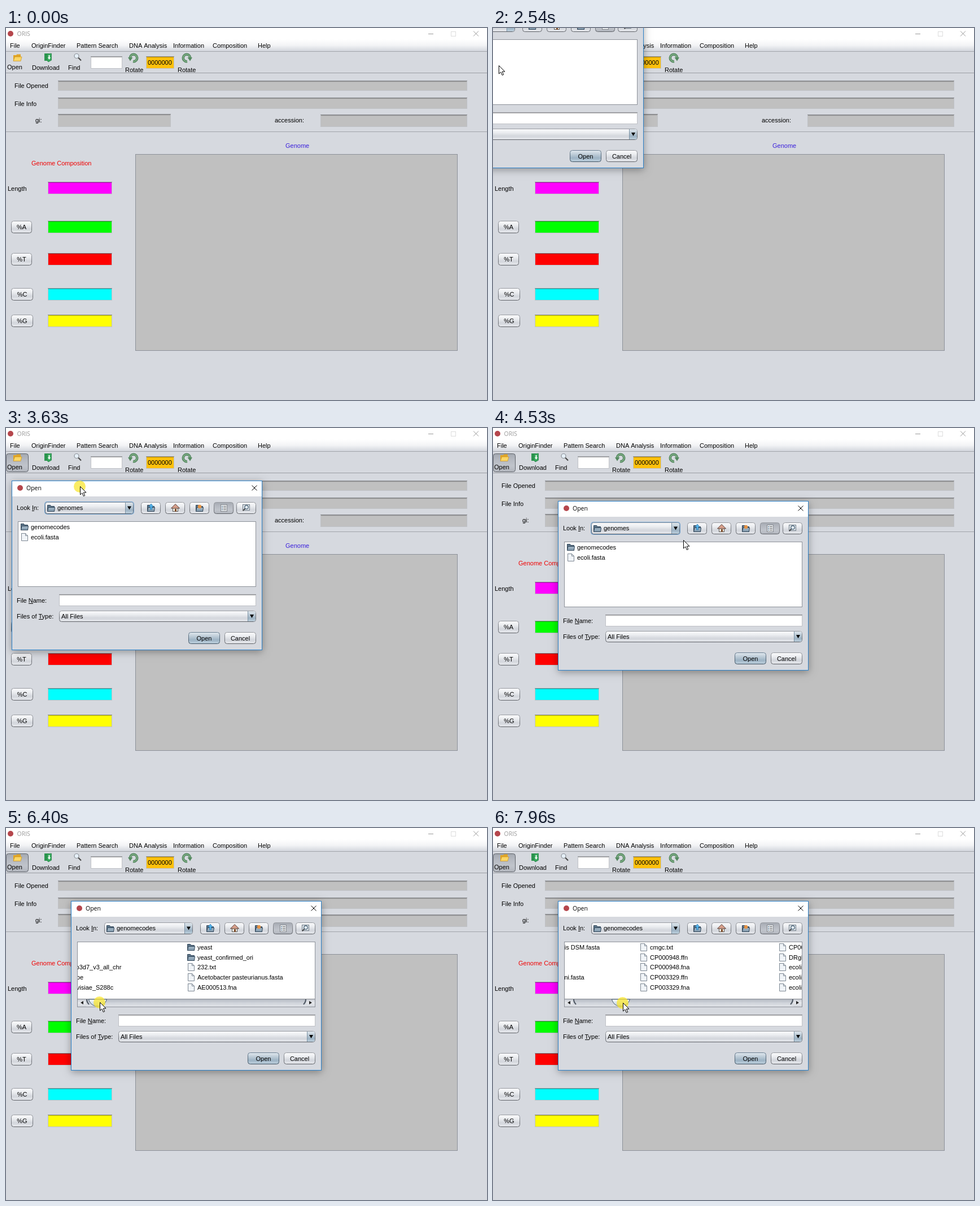
An HTML page with a canvas for the animation above (7.99 s loop, 852 px wide and 658 px high).

```html
<!DOCTYPE html>
<html lang="en">
<head>
<meta charset="utf-8">
<title>Genome viewer</title>
<style>
html, body { margin: 0; width: 100%; height: 100%; overflow: hidden; background: #d6d9df; }
canvas { display: block; width: 100vw; height: 100vh; }
</style>
</head>
<body>
<canvas id="stage" width="852" height="658"></canvas>
<script>
const c = document.getElementById('stage').getContext('2d');
const LOOP = 7990;
const UI = '11px "Liberation Sans", Arial, sans-serif';
const TITLE = '10.5px "Open Sans", sans-serif';
const BG = '#d6d9df', GREY = '#c0c0c0', EDGE = '#8d9199';
const LIGHT = ['#fbfbfc', '#eceef1', '#d3d6dc', '#e9ebef'];
const BLUE = ['#e3eaf0', '#c0ced9', '#9db3c4', '#c3d5e2'];
const DARK = ['#a3a8b0', '#b5b9c1', '#c0c4cb', '#b0b4bc'];

// Mouse positions: time, x, y
const mouse = [
  [60, 790, 705], [940, 14, 66], [2440, 14, 66], [2540, 10, 66], [2800, -56, -42],
  [3380, -56, -42], [3630, 131, 103], [3950, 236, 139], [4110, 236, 139],
  [4450, 348, 190], [4530, 337, 198], [4880, 174, 210], [5250, 174, 210],
  [5690, 180, 262], [5960, 166, 322], [6180, 161.6, 308], [6290, 161.6, 308],
  [6400, 166, 308], [6930, 191.8, 309], [7300, 227, 309], [7420, 229, 309],
  [7615, 229, 309], [7635, 229.4, 309], [7930, 229.4, 309], [7960, 230, 309]
];
const presses = [[970, 1240], [3380, 4110], [4900, 5000], [5060, 5150], [6220, LOOP]];

const columns = [
  ['data', 'ecoli', 'Plasmp3d7_v3_all_chr', 'S.pombe', 'S.cerevisiae_S288c'],
  ['yeast', 'yeast_confirmed_ori', '232.txt', 'Acetobacter pasteurianus.fasta', 'AE000513.fna'],
  ['AE000513.ptt', 'Aeropyrum pernix K1.fasta', 'AeropyrumpernixK1.fasta', 'APglimmer.txt', 'ars1.txt'],
  ['Bacillus thuringiensis DSM.fasta', 'BLglimmer.txt', 'BSglimmer.txt', 'Campylobacter jejuni.fasta', 'CEM.py'],
  ['cmgc.txt', 'CP000948.ffn', 'CP000948.fna', 'CP003329.ffn', 'CP003329.fna'],
  ['CP003329.ptt', 'DRglimmer.txt', 'ecoli.fasta', 'ecoli.fna', 'ecoli.ptt']
];

// Monotone cubic through the keys
function follow(keys, t, k) {
  const last = keys.length - 1;
  if (t <= keys[0][0]) return keys[0][k];
  if (t >= keys[last][0]) return keys[last][k];
  let i = 0;
  while (t >= keys[i + 1][0]) i++;
  const slope = j => (keys[j + 1][k] - keys[j][k]) / (keys[j + 1][0] - keys[j][0]);
  const tangent = j => {
    if (j === 0 || j === last) return 0;
    const a = slope(j - 1), b = slope(j);
    return a * b <= 0 ? 0 : 2 * a * b / (a + b);
  };
  const h = keys[i + 1][0] - keys[i][0], u = (t - keys[i][0]) / h, v = 1 - u;
  return keys[i][k] * (1 + 2 * u) * v * v + keys[i + 1][k] * (3 - 2 * u) * u * u
    + h * u * v * (tangent(i) * v - tangent(i + 1) * u);
}

function rect(x, y, w, h, color) { c.fillStyle = color; c.fillRect(x, y, w, h); }

function frame(x, y, w, h, color) {
  c.strokeStyle = color; c.lineWidth = 1;
  c.strokeRect(x + .5, y + .5, w - 1, h - 1);
}

function text(s, x, y, color = '#000', font = UI, align = 'left') {
  c.font = font; c.fillStyle = color; c.textAlign = align;
  c.fillText(s, x, y);
}

function path(points, fill, stroke, width = 1) {
  c.beginPath();
  for (let i = 0; i < points.length; i += 2) c.lineTo(points[i], points[i + 1]);
  if (fill) { c.closePath(); c.fillStyle = fill; c.fill(); }
  if (stroke) { c.strokeStyle = stroke; c.lineWidth = width; c.stroke(); }
}

function disc(x, y, r, color) {
  c.beginPath(); c.arc(x, y, r, 0, 7); c.fillStyle = color; c.fill();
}

function blend(y, h, colors) {
  const g = c.createLinearGradient(0, y, 0, y + h);
  colors.forEach((s, i) => g.addColorStop(i / (colors.length - 1), s));
  return g;
}

function button(x, y, w, h, label, colors = LIGHT) {
  c.beginPath(); c.roundRect(x + .5, y + .5, w - 1, h - 1, 4);
  c.fillStyle = blend(y, h, colors); c.fill();
  c.strokeStyle = blend(y, h, colors === BLUE ? ['#6d8294', '#3d4f5e'] : ['#9a9da3', '#5b5e64']);
  c.lineWidth = 1; c.stroke();
  if (label) text(label, x + w / 2, Math.round(y + h / 2 + 4), '#000', UI, 'center');
}

function field(x, y, w, h, color) {
  rect(x, y, w, h, '#bfc1c6');
  rect(x + 1, y + 1, w - 2, h - 2, color);
  rect(x, y, w, 1, '#8b8d92');
  rect(x + 1, y + 1, w - 2, 1, 'rgba(0,0,0,.25)');
  rect(x + 1, y + 2, w - 2, 1, 'rgba(0,0,0,.06)');
}

function cross(x, y, size, color) {
  path([x, y, x + size, y + size], null, color);
  path([x + size, y, x, y + size], null, color);
}

function mnemonic(s, at, x, y) {
  text(s, x, y);
  const from = c.measureText(s.slice(0, at)).width;
  rect(Math.round(x + from), y + 1, Math.ceil(c.measureText(s[at]).width), 1, '#000');
}

function folder(x, y) {
  path([x + .5, y + 12.5, x + .5, y + 1.5, x + 5.5, y + 1.5, x + 7, y + 3.5, x + 12.5, y + 3.5, x + 12.5, y + 12.5], '#5c7488', '#33475a');
  path([x + .5, y + 12.5, x + 2, y + 5.5, x + 13.5, y + 5.5, x + 12.5, y + 12.5], blend(y + 5, 8, ['#a9bdcc', '#7b94a8']), '#33475a');
}

function file(x, y) {
  path([x + .5, y + .5, x + 7.5, y + .5, x + 11.5, y + 4.5, x + 11.5, y + 13.5, x + .5, y + 13.5, x + .5, y], '#f0f4f8', '#7d8792');
  path([x + 7.5, y + .5, x + 7.5, y + 4.5, x + 11.5, y + 4.5], null, '#7d8792');
}

function lens(x, y, r, color, side = 1) {
  path([x + side * r * .7, y + r * .7, x + side * r * 2, y + r * 2], null, '#444', 2);
  disc(x, y, r, '#e6f0f8');
  c.strokeStyle = color; c.lineWidth = 1.2; c.stroke();
}

function rotateIcon(x, flip) {
  c.save();
  c.translate(x, 53);
  c.scale(flip, 1);
  c.beginPath(); c.arc(0, 0, 6.2, -Math.PI * 1.02, Math.PI * .55);
  c.strokeStyle = '#4b7f57'; c.lineWidth = 4.5; c.stroke();
  c.strokeStyle = '#7fae86'; c.lineWidth = 2; c.stroke();
  path([-10, -1, -1.5, -1, -6, 5.5], '#558a60');
  c.restore();
}

function toolbar(t) {
  if (t >= 905) {
    const on = t >= 970;
    c.beginPath(); c.roundRect(.5, 45.5, 39, 32, 4);
    c.fillStyle = blend(45, 33, on ? DARK : LIGHT); c.fill();
    c.strokeStyle = on ? '#5f636a' : '#92959c'; c.lineWidth = 1; c.stroke();
  }
  path([13, 58, 13, 48, 18, 48, 19.5, 46.5, 26, 46.5, 26, 58], '#e0a526');
  path([13, 58.5, 15.5, 51, 28, 51, 26, 58.5], '#fbd766', '#c98f1c', .7);
  rect(68, 45, 8, 13, '#2d9650');
  path([72, 46, 80.5, 45, 80.5, 57, 75, 60, 72, 57], '#35a85b', '#23783f', .7);
  path([74, 52, 79, 52, 76.5, 56], '#fff');
  rect(75.5, 48, 2, 4, '#fff');
  lens(125, 49.5, 4, '#8d9299');

  text('Open', 2, 73); text('Download', 46, 74); text('Find', 110, 74);
  field(150, 50, 56, 22, '#fff');
  rotateIcon(226, 1); text('Rotate', 211, 78);
  field(248, 50, 50, 22, '#fdc10c');
  text('0000000', 251, 65);
  rotateIcon(320, -1); text('Rotate', 304, 78);
}

function mainWindow(t) {
  rect(0, 0, 852, 658, BG);
  rect(0, 0, 852, 21, '#fff');
  const active = t >= 970 && t < 2160;
  const ink = active ? '#000' : '#999';
  disc(8, 10, 5, '#b5464c');
  text('ORIS', 19.5, 13.5, ink, TITLE);
  rect(748, 10, 9, 1, ink);
  frame(788, 6, 9, 9, active ? '#bbb' : '#ddd');
  cross(828, 5.5, 9, ink);

  rect(0, 20, 852, 21, blend(20, 21, ['#fff', '#f3f4f6', '#d3d6dd']));
  rect(0, 41, 852, 1, '#a2a5ab');
  const menu = { File: 7, OriginFinder: 45, 'Pattern Search': 125, 'DNA Analysis': 218, Information: 296, Composition: 366, Help: 446 };
  for (const item in menu) text(item, menu[item], 35);
  toolbar(t);
  rect(0, 79, 852, 1, '#999ca2');

  text('File Opened', 15, 106); field(92, 93, 725, 18, GREY);
  text('File Info', 15, 138); field(92, 123, 725, 20, GREY);
  text('gi:', 52, 167); field(92, 152, 200, 23, GREY);
  text('accession:', 476, 167); field(557, 153, 260, 22, GREY);
  rect(0, 183, 852, 1, '#a0a3a9');

  text('Genome', 495, 212, '#3a1fdc');
  text('Genome Composition', 45, 243, '#f00000');
  rect(229, 223, 571, 348, GREY);
  frame(229, 223, 571, 348, EDGE);
  text('Length', 3, 288);
  field(74, 272, 114, 22, '#f0f');
  [['%A', 341, 37, '#0f0'], ['%T', 398, 37, '#f00'], ['%C', 460, 39, '#0ff'], ['%G', 507, 39, '#ff0']].forEach(([s, y, w, color]) => {
    button(9, y, w, 22, s);
    field(74, y, 114, 22, color);
  });
}

function combo(x, y, w, h, label, tx, focus) {
  if (focus) {
    c.beginPath(); c.roundRect(x - 1, y - 1, w + 2, h + 2, 5);
    c.fillStyle = '#73a4d1'; c.fill();
  }
  button(x, y, w, h);
  c.save();
  c.beginPath(); c.roundRect(x + w - 15, y + 1, 14, h - 2, [0, 3, 3, 0]); c.clip();
  rect(x + w - 15, y, 15, h, blend(y, h, BLUE));
  rect(x + w - 15, y, 1, h, '#7d93a5');
  c.restore();
  const ax = x + w - 7.5, ay = y + h / 2 - 3;
  path([ax - 3.5, ay, ax + 3.5, ay, ax, ay + 6], '#000');
  text(label, tx, y + 14);
}

function toolButtons() {
  [229, 272, 315, 358, 398].forEach((x, i) => button(x, 38, 35, 21, '', i === 3 ? DARK : LIGHT));
  folder(240, 42);
  path([247, 41, 251, 46, 248.5, 46, 248.5, 51, 245.5, 51, 245.5, 46, 243, 46], '#55b3ea', '#2573a8', .7);
  rect(285, 48, 10, 7, '#f5f0e2');
  frame(285, 48, 10, 7, '#5a5a5a');
  path([282.5, 49, 290, 41.5, 297.5, 49], '#d8a08c', '#553d35');
  rect(289, 50, 3, 5, '#7c4c2c');
  folder(326, 42);
  disc(333, 46, 3.2, '#e59345');
  rect(370, 42, 12, 13, '#e6e9ec');
  frame(370, 42, 12, 13, '#85898f');
  for (let y = 45; y < 54; y += 3) {
    rect(372, y, 2, 1, '#315b80');
    rect(375, y, 5, 1, '#666');
  }
  rect(409, 42, 13, 11, '#dfe5ea');
  frame(409, 42, 13, 11, '#6d7a86');
  lens(416, 47, 3.2, '#41596d', -1);
}

function row(name, x, i, isFolder, selected) {
  const y = 82 + Math.round(i * 17.65);
  if (selected) rect(x - 3, y - 9, c.measureText(name).width + 24, 18, '#39698a');
  isFolder ? folder(x - 1, y - 7) : file(x, y - 7);
  text(name, x + 17, y + 4, selected ? '#fff' : '#000');
}

function scrollbar(pos) {
  rect(12, 173, 421, 14, blend(173, 14, ['#c3c7cf', '#e6e8ec', '#d3d7dd']));
  rect(12, 173, 421, 1, '#868a91');
  rect(27, 174, 390, 13, blend(174, 13, ['#b3b8c1', '#d0d4db', '#e0e3e8']));
  c.strokeStyle = '#4d5661'; c.lineWidth = 2;
  c.beginPath(); c.moveTo(28, 174); c.quadraticCurveTo(28, 179, 32, 183); c.stroke();
  c.beginPath(); c.moveTo(416, 174); c.quadraticCurveTo(416, 179, 412, 183); c.stroke();
  path([17, 180, 22, 177, 22, 183], '#222');
  path([427, 180, 422, 177, 422, 183], '#222');
  const x = 27 + pos;
  c.beginPath(); c.moveTo(x, 174);
  c.bezierCurveTo(x + 3, 183, x + 8, 186, x + 16, 186);
  c.bezierCurveTo(x + 24, 186, x + 29, 183, x + 32, 174);
  c.closePath();
  c.fillStyle = blend(173, 13, ['#fdfeff', '#dbe6ef', '#b9cbd9']); c.fill();
  c.strokeStyle = '#455c70'; c.lineWidth = 1; c.stroke();
}

function fileList(t, pos) {
  const inside = t >= 5150;
  rect(11, 72, 422, 116, '#fff');
  c.save();
  c.beginPath(); c.rect(12, 73, 420, inside ? 100 : 114); c.clip();
  c.font = UI;
  if (inside) {
    const shift = Math.round(pos * 12.5);
    columns.forEach((names, k) => names.forEach((name, i) =>
      row(name, 17 + 246 * k - shift, i, k === 0 || (k === 1 && i < 2))));
  } else {
    row('genomecodes', 17, 0, true, t >= 4910);
    row('ecoli.fasta', 17, 1, false);
  }
  c.restore();
  if (inside) scrollbar(pos);
  frame(11, 72, 422, 116, EDGE);
}

function dialog(t, x, y, pos) {
  const show = Math.min(1, (t - 2140) / 180), size = .92 + .08 * show;
  c.save();
  c.globalAlpha = show;
  c.translate(x + 222, y + 150); c.scale(size, size); c.translate(-222, -150);
  c.save();
  c.shadowColor = 'rgba(0,0,0,.34)'; c.shadowBlur = 13; c.shadowOffsetY = 3;
  rect(0, 0, 444, 300, BG);
  c.restore();
  rect(1, 1, 442, 27, '#fff');
  frame(0, 0, 444, 300, '#2a80c8');
  disc(15, 13, 5, '#b5464c');
  text('Open', 26, 17, '#000', TITLE);
  cross(425.5, 8.5, 9, '#000');

  mnemonic('Look In:', 5, 9, 52);
  combo(59, 38, 157, 21, t >= 5150 ? 'genomecodes' : 'genomes', 81, t >= 2950 && t < 4910);
  folder(63, 42);
  toolButtons();
  fileList(t, pos);
  mnemonic('File Name:', 5, 9, 216);
  field(84, 201, 349, 21, '#fff');
  mnemonic('Files of Type:', 9, 9, 244);
  combo(84, 230, 349, 20, 'All Files', 88, false);
  button(313, 268, 56, 21, 'Open', BLUE);
  button(377, 268, 56, 21, 'Cancel');
  c.restore();
}

function pointer(t, x, y) {
  if (presses.some(([a, b]) => t >= a && t < b)) disc(x - .5, y + .5, 10.5, 'rgba(250,230,50,.75)');
  c.save();
  c.translate(x + .5, y + .5);
  path([0, 0, 0, 14.5, 3.4, 11.4, 5.8, 17, 8.2, 16, 5.8, 10.6, 10.5, 10.6, 0, 0], '#fff', '#000');
  c.restore();
}

function draw(now) {
  const t = now % LOOP;
  const mx = follow(mouse, t, 1), my = follow(mouse, t, 2);
  const px = Math.round(mx), py = Math.round(my);
  mainWindow(t);
  if (t >= 2160) {
    const dx = t < 3380 ? -177 : t < 3950 ? px - 121 : 115;
    const dy = t < 3380 ? -52 : t < 3950 ? py - 10 : 129;
    dialog(t, dx, dy, t < 6290 ? 0 : Math.max(0, mx - 161.6));
  }
  pointer(t, px, py);
}

const start = performance.now();
function tick() {
  draw(performance.now() - start);
  requestAnimationFrame(tick);
}
tick();
</script>
</body>
</html>
```
